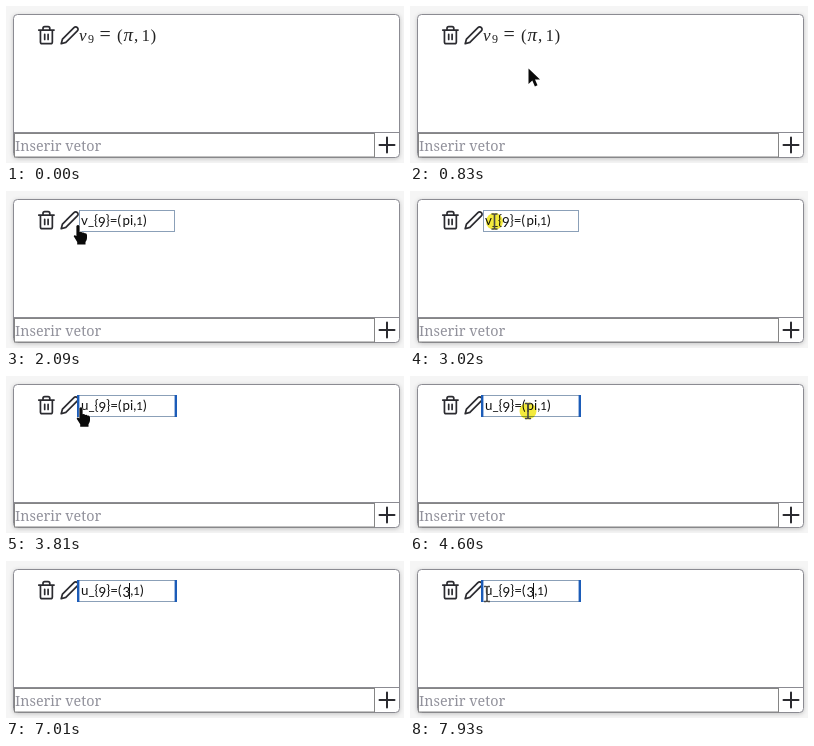
An HTML page for the animation above (8000 ms loop, 398x157 px).

```html
<!DOCTYPE html>
<html lang="pt">
<head>
<meta charset="utf-8">
<style>
  html, body { margin: 0; width: 100%; height: 100%; overflow: hidden; background: #f5f5f5; }
  svg { display: block; }
  .card { fill: #fff; stroke: #8b8b92; filter: drop-shadow(0 1px 2px #0003); }
  .icon { fill: none; stroke: #2b2b30; stroke-width: 2; stroke-linecap: round; stroke-linejoin: round; }
  .hint { font: 14.3px "Noto Serif", serif; fill: #92929c; }
  .math { font: 17px "Liberation Serif", serif; fill: #222; }
  .edit { font: 13.33px Lato, sans-serif; fill: #111; }
  .press { fill: #f3ea3c; mix-blend-mode: multiply; }
  .pointer { fill: #0a0a0a; stroke: #fff; stroke-width: 1; stroke-linejoin: round; paint-order: stroke; }
</style>
</head>
<body>
<svg width="398" height="157" viewBox="0 0 398 157">
  <rect class="card" x="7.5" y="8.5" width="386" height="143" rx="4"/>
  <path d="M8 126.5H393" stroke="#8b8b92"/>
  <rect x="8.5" y="127.5" width="360" height="23.5" fill="#fff" stroke="#858585"/>
  <text class="hint" x="9" y="145">Inserir vetor</text>
  <path class="icon" d="M373.5 139H388.5M381 131.5V146.5"/>
  <g class="icon">
    <path transform="translate(30.2 19) scale(.85)" d="M3 6H21M19 6v14a2 2 0 0 1-2 2H7a2 2 0 0 1-2-2V6m3 0V4a2 2 0 0 1 2-2h4a2 2 0 0 1 2 2v2M10 11v6M14 11v6"/>
    <path transform="translate(53.5 19) scale(.85)" d="M17 3a2.828 2.828 0 1 1 4 4L7.5 20.5 2 22l1.5-5.5z"/>
  </g>
  <g id="field"></g>
  <g id="cursor"></g>
</svg>
<script>
const LOOP = 8000, START = 512, TICK = 78;
const field = document.getElementById('field');
const cursor = document.getElementById('cursor');

// Pointer path: tick, x, y, shape
const path = [
  [0, 278, 126, 'arrow'], [1, 240, 97, 'arrow'], [4, 118, 62, 'arrow'], [6, 98, 54, 'arrow'],
  [9, 74, 43, 'arrow'], [10, 69, 39, 'hand'], [11, 66, 36, 'hand'], [12, 66, 36, 'hand'],
  [13, 63, 34, 'hand'], [19, 63, 34, 'hand'], [20, 72, 34, 'hand'], [21, 82, 32, 'beam'],
  [23, 92, 31, 'beam'], [28, 92, 31, 'beam'], [30, 88, 31, 'beam'], [31, 88, 31, 'beam'],
  [32, 84.5, 30.5, 'beam'], [33, 70, 27, 'hand'], [34, 59, 25, 'hand'], [36, 59, 25, 'hand'],
  [38, 67, 30, 'hand'], [40, 67, 30, 'hand'], [43, 79, 32, 'beam'], [50, 118, 35, 'beam'],
  [54, 118, 35, 'beam'], [56, 123, 34, 'beam'], [58, 123, 34, 'beam'], [60, 126, 33, 'beam'],
  [61, 126, 33, 'beam'], [62, 127, 33, 'beam'], [63, 127, 33, 'beam'], [64, 133, 30, 'beam'],
  [66, 158, 20, 'arrow'], [68, 168, 17, 'arrow'], [80, 168, 17, ''],
  [90, 167, 12, 'arrow'], [91, 150, 20, 'beam'], [95, 77, 33, 'beam'], [99, 77, 33, 'beam']
];
const shapes = {
  arrow: '<path class="pointer" d="M.5.5V16l3.8-3.4 2.6 5.8 2.6-1.1-2.5-5.7H12z"/>',
  hand: '<path class="pointer" d="M-1.6 1Q0-1 1.6 1V7q1.6-.8 2.6.6 1.600-.6 2.500.7 2.300-.4 2.300 1.900V13q0 2.200-1.500 4v2.500H-.8V17L-4.300 11.300q.6-2 2.700-.2z"/>',
  beam: '<path d="M-3-7.500H-1Q0-7.500 0-6V6Q0 7.500-1 7.500H-3M3-7.500H1Q0-7.500 0-6V6Q0 7.500 1 7.500H3" fill="none" stroke="#4a4a48" stroke-width="1.6"/>'
};
const presses = [[13, 15], [27, 36], [52, 64]];

const within = (n, a, b) => n >= a && n < b;
const mark = (x, width) => `<rect x="${x}" y="22" width="${width}" height="16" fill="#000"/>`;
const ink = on => on ? '#fff' : '#111';

function drawField(n) {
  if (n < 15) {
    return `<text class="math" y="35"><tspan x="73" font-style="italic">v</tspan>
      <tspan x="82" y="37" font-size="12">9</tspan><tspan x="93.500" y="35" font-size="20">=</tspan>
      <tspan x="111">(</tspan><tspan x="117.500" font-style="italic" font-size="19">π</tspan>
      <tspan x="128">,</tspan><tspan x="135.500">1</tspan><tspan x="144.500">)</tspan></text>`;
  }
  const focused = n >= 33;
  const first = n < 41 ? 'v' : 'u', firstOn = within(n, 33, 41);
  const value = n < 83 ? ['p', 'i'] : ['3', ''];
  const pOn = within(n, 55, 83), iOn = within(n, 59, 83);
  const caret = within(n, 83, 88) || n >= 95;
  const drop = n < 83 ? 0 : 2;
  return `<rect x="${focused ? 71.5 : 73.5}" y="19.5" width="${focused ? 99 : 95}" height="21" fill="#fff" stroke="#8ba0b8"/>
    ${focused ? '<path d="M72.200 19V41M169.800 19V41" stroke="#1c5cb8" stroke-width="2.400"/>' : ''}
    ${firstOn ? mark(75, 7) : ''}${pOn ? mark(116, iOn ? 12 : 8) : ''}
    <text class="edit" x="75" y="34"><tspan fill="${ink(firstOn)}">${first}</tspan>_{<tspan dy="2">9</tspan><tspan dy="-2">}=(</tspan><tspan x="116.500" dy="${drop}" fill="${ink(pOn)}">${value[0]}</tspan><tspan fill="${ink(iOn)}">${value[1]}</tspan><tspan dy="${-drop}">,</tspan><tspan font-size="11.500">1</tspan>)</text>
    ${caret ? '<path d="M123.500 22V38" stroke="#111"/>' : ''}`;
}

function drawCursor(n) {
  const i = path.findLastIndex(key => key[0] <= n);
  if (i < 0 || !path[i][3]) return '';
  const [n0, x0, y0, shape] = path[i];
  const [n1, x1, y1] = path[i + 1] || path[i];
  const k = n1 > n0 ? (n - n0) / (n1 - n0) : 0;
  const x = x0 + (x1 - x0) * k, y = y0 + (y1 - y0) * k;
  const pressed = presses.some(([a, b]) => within(n, a, b));
  return (pressed ? `<circle class="press" cx="${x}" cy="${y}" r="8.5"/>` : '') +
    `<g transform="translate(${x} ${y})">${shapes[shape]}</g>`;
}

let last;
function frame() {
  const n = Math.floor((performance.now() % LOOP - START) / TICK);
  if (n !== last) {
    field.innerHTML = drawField(n);
    cursor.innerHTML = drawCursor(n);
    last = n;
  }
  requestAnimationFrame(frame);
}
frame();
</script>
</body>
</html>
```
